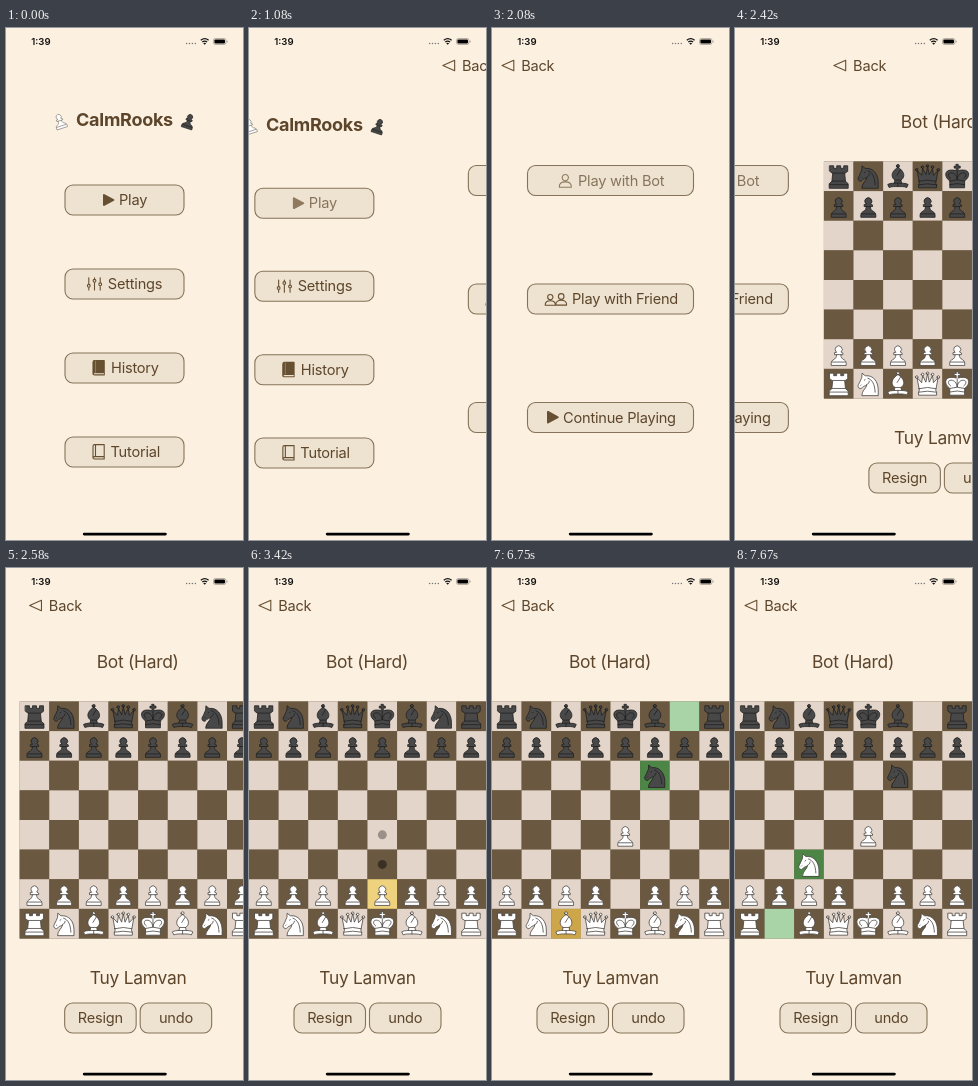
Animation, 237 px wide and 512 px high, one loop 8 s. Source, as an HTML page:

```html
<!DOCTYPE html>
<html lang="en">
<head>
<meta charset="utf-8">
<title>Chess app</title>
<style>
html, body { margin: 0; width: 100%; height: 100%; overflow: hidden; background: #fcf0e0; }
svg { display: block; width: 100vw; height: 100vh; }
text { font-family: Inter, Roboto, sans-serif; font-size: 14.6px; letter-spacing: -.015em; fill: #5c452b; }
.name { font-size: 17.4px; text-anchor: middle; }
.title { font-size: 18px; font-weight: 700; text-anchor: middle; }
.mid { text-anchor: middle; }
.clock { font-size: 9.6px; font-weight: 600; letter-spacing: 0; fill: #111; }
.btn { fill: #eee3d0; stroke: #85745a; stroke-width: 1.1; }
.solid { fill: #674f31; }
.line { fill: none; stroke: #674f31; stroke-width: 1.1; stroke-linejoin: round; stroke-linecap: round; }
</style>
</head>
<body>
<svg id="stage" viewBox="0 0 237 512" preserveAspectRatio="none"></svg>
<script>
const W = 237, LOOP = 8000, TOP = 133.5, CELL = W / 8;
const stage = document.getElementById('stage');

function el(parent, tag, attrs, text) {
  const e = document.createElementNS('http://www.w3.org/2000/svg', tag);
  for (const k in attrs) e.setAttribute(k, attrs[k]);
  if (text) e.textContent = text;
  parent.appendChild(e);
  return e;
}
const group = (parent, attrs) => el(parent, 'g', attrs || {});
const path = (parent, cls, d) => el(parent, 'path', { class: cls, d });
const label = (parent, x, y, text, cls) => el(parent, 'text', { x, y, class: cls || '' }, text);
const ring = (x, y, r) => `M${x - r} ${y}a${r} ${r} 0 1 0 ${2 * r} 0a${r} ${r} 0 1 0 ${-2 * r} 0z`;
const move = (e, x, y) => e.setAttribute('transform', `translate(${x} ${y})`);

// Piece outlines in a 30 x 30 box: body, then inner lines
const SHAPES = {
  p: ['M12.7 13a3.5 3.5 0 1 1 4.6 0l1.9 1v1.6h-2.1c.1 2.7 1 4 3.4 5.2q2 1 2 3.2v2.4h-15v-2.4q0-2.2 2-3.2c2.4-1.2 3.3-2.5 3.4-5.2h-2.1v-1.6z',
    'M8.5 23h13M12.9 15.6h4.2'],
  r: ['M6 4.5h4v2.5h3v-2.5h4v2.5h3v-2.5h4v5.5l-3 2.2 .8 7.8 2.7 2.4v4.6h-19v-4.6l2.7-2.4 .8-7.8-3-2.2z',
    'M9 11.8h12M8.6 19.8h12.8M6 23.4h18'],
  n: ['M8.5 26.6c0-5 4.6-6.6 5-10.6-1.5 1.3-3 1.5-4 2.3-1 .9-1.5 2-2.8 1.6-2-.6-2.5-2.6-1.5-4.2 1.6-2.4 2.2-5 3.3-7l.2-4.2 3.2 2.6c8-.9 13 5.7 13 14.3v5.2z',
    'M14.5 9.5c4.5 1.5 7 6 7.3 14M11 11.5l.8-.5M7.3 16.7l.4-.4M13.5 16c1.6-.9 2.3-2 2.5-3.4'],
  b: [ring(15, 4.6, 1.5) + 'M15 5.8c4 2.8 6.2 5.8 5.8 8.8-.3 2-1.4 3.2-2.8 4.2l.6 3c2.5.2 4.8.3 6.6 1.4l-1.4 3c-2.6-1.2-6.2-.9-8.8-.9s-6.2-.3-8.8.9l-1.4-3c1.8-1.1 4.1-1.2 6.6-1.4l.6-3c-1.4-1-2.5-2.2-2.8-4.2-.4-3 1.8-6 5.8-8.8z',
    'M17.6 8.4l-3.4 5.4M12 18.8h6M11.4 21.8h7.2M15 21.8v3.4'],
  q: ['M6.5 20L4.5 9l4.6 5 1-7 3.2 6.5L15 5l1.7 8.5 3.2-6.5 1 7 4.6-5-2 11c-.6 1-.4 2 .5 3.5v3h-18v-3c.9-1.5 1.1-2.5.5-3.5z' +
    ring(4.2, 8.4, 1.3) + ring(10, 5.8, 1.3) + ring(15, 4.6, 1.3) + ring(20, 5.8, 1.3) + ring(25.8, 8.4, 1.3),
    'M6.5 20q8.5-2.5 17 0M6 23.5q9-2 18 0'],
  k: ['M14 3h2v1.8h2v2h-2v2.6c1.5-.6 3.2-.7 5-.7 6.5 0 7.5 6.5 1.4 11v6.8H7.6v-6.8C1.500 15.200 2.500 8.700 9 8.700c1.800 0 3.500.1 5 .7V6.800h-2v-2h2z',
    'M7.600 19.700q7.400-2.500 14.800 0M7.600 23.300q7.400-2 14.800 0M15 10v8M15 18c-.6-4-3-6.500-6-6.500-3.500 0-3.600 3.500-.6 5.800M15 18c.6-4 3-6.500 6-6.500 3.500 0 3.600 3.500.6 5.800']
};

function piece(parent, kind, black) {
  const g = group(parent, { fill: black ? '#484848' : '#fff', stroke: black ? '#202020' : '#4a4642',
    'stroke-width': .8, 'stroke-linejoin': 'round', 'stroke-linecap': 'round' });
  el(g, 'path', { d: SHAPES[kind][0] });
  el(g, 'path', { d: SHAPES[kind][1], fill: 'none' });
  return g;
}

// Returns the group that holds the button's icon and text
function button(parent, x, y, w, text, textX) {
  el(parent, 'rect', { x, y, width: w, height: 30, rx: 8, class: 'btn' });
  const g = group(parent);
  label(g, textX || x + w / 2, y + 20.2, text, textX ? '' : 'mid');
  return g;
}

function back(parent) {
  path(parent, 'line', 'M10 37.5L21.800 32.300v10.400z');
  label(parent, 29.200, 42.700, 'Back');
}

const person = (x, y, k) => ring(x, y - 3.4 * k, 3.1 * k) +
  `M${x - 6 * k} ${y + 6.2 * k}c${-.3 * k} ${-4 * k} ${2.5 * k} ${-5.3 * k} ${6 * k} ${-5.3 * k}s${6.3 * k} ${1.3 * k} ${6 * k} ${5.3 * k}z`;

// Main menu
const menu = group(stage);
const rows = [];
const row = () => { const g = group(menu); rows.push(g); return g; };

const head = row();
label(head, 118.5, 98.2, 'CalmRooks', 'title');
const pawns = [false, true].map(black => piece(head, 'p', black));
pawns[0].setAttribute('transform', 'translate(54 93.3) rotate(-18) scale(.74) translate(-15 -16.5)');
pawns[0].setAttribute('stroke', '#77726c');
pawns[1].setAttribute('transform', 'translate(182.7 93.3) rotate(18) scale(.74) translate(-15 -16.5)');

const play = button(row(), 59, 157, 119, 'Play', 113);
path(play, 'solid', 'M97 167.2q0-1.6 1.5-.9l9.4 4.9q1.2.8 0 1.6l-9.4 4.9q-1.5.7-1.5-.9z');

const settings = button(row(), 59, 241, 119, 'Settings', 101.8);
path(settings, 'line', [[82.8, 257.8], [88.5, 252.8], [94.2, 256.3]].map(([x, y]) =>
  `M${x} 249.8V${y - 1.4}M${x} ${y + 1.4}V262` + ring(x, y, 1.4)).join(''));

const book = y => `M88.6 ${y}h9.6v12h-9.6q-1.6 0-1.6 1.4v-11.8q0-1.6 1.6-1.6zM87 ${y + 13}q0 1.400 1.600 1.400h9.600v-2.400`;
const spine = y => `M89.500 ${y + .4}v11.200`;
const history = button(row(), 59, 325, 119, 'History', 105);
path(history, 'line', book(332.6)).style.fill = '#674f31';
path(history, 'line', 'M88.500 345.800h9').style.stroke = '#eee3d0';
path(history, 'line', spine(332.6)).style.stroke = '#8d795c';

const tutorial = button(row(), 59, 409, 119, 'Tutorial', 104.5);
path(tutorial, 'line', book(416.6) + spine(416.6));

const drops = [5, 3.2, 2.2, 1.8, 1];

// Mode menu
const modes = group(stage);
back(modes);
const bot = button(modes, 35.5, 137.5, 166, 'Play with Bot', 86);
path(bot, 'line', person(73.3, 153, 1));
const friend = button(modes, 35.5, 256, 166, 'Play with Friend', 80);
path(friend, 'line', person(58.3, 272, .85) + person(69.2, 271.5, .9));
const resume = button(modes, 35.5, 374.5, 166, 'Continue Playing', 71);
path(resume, 'solid', 'M55 384q0-1.6 1.5-.9l9.8 5.3q1.2.8 0 1.6l-9.8 5.3q-1.5.7-1.5-.9z');

// Game screen
const game = group(stage);
back(game);
label(game, 118, 99.8, 'Bot (Hard)', 'name');
label(game, 118.5, 416.3, 'Tuy Lamvan', 'name');
button(game, 45, 435, 71.5, 'Resign');
button(game, 120.5, 435, 71.5, 'undo');

const LIGHT = { base: '#e3d5ca', last: '#a9d4a8', pick: '#efd27d' };
const DARK = { base: '#6b5840', last: '#4d8546', pick: '#cda64a' };
const shade = (c, r) => (c + r) % 2 ? DARK : LIGHT;
const cells = [], men = [];
el(game, 'rect', { x: 0, y: TOP, width: W, height: W, fill: DARK.base });
for (let i = 0; i < 64; i++) {
  cells.push(el(game, 'rect', { x: i % 8 * CELL, y: TOP + (i >> 3) * CELL, width: CELL, height: CELL }));
}
const dotLayer = group(game), manLayer = group(game);
['rnbqkbnr', 'pppppppp', '', '', '', '', 'pppppppp', 'rnbqkbnr'].forEach((line, r) =>
  [...line].forEach((kind, c) => {
    const man = men[r * 8 + c] = piece(manLayer, kind, r < 2);
    placeMan(man, c, r);
  }));
const dots = [0, 1].map(() => el(dotLayer, 'circle', { r: 4.5 }));

function placeMan(man, c, r) {
  move(man, c * CELL - .2, TOP + r * CELL - .2);
}

// Squares are [column, row]
const moves = [
  { at: 3940, from: [4, 6], to: [4, 4] },
  { at: 5190, from: [6, 0], to: [5, 2] },
  { at: 7357, from: [1, 7], to: [2, 5] }
];
for (const m of moves) {
  m.man = men[m.from[1] * 8 + m.from[0]];
  manLayer.appendChild(m.man);
}
const picks = [
  { at: 3410, end: 3990, sq: [4, 6], goals: [[4, 5], [4, 4]] },
  { at: 5910, end: 6740, sq: [3, 6], goals: [[3, 5], [3, 4]] },
  { at: 6740, end: 6990, sq: [2, 7], goals: [] },
  { at: 6990, end: 7410, sq: [1, 7], goals: [[0, 5], [2, 5]] }
];

// Status bar and home indicator
label(stage, 25.2, 17.2, '1:39', 'clock');
for (let i = 0; i < 4; i++) el(stage, 'circle', { cx: 180.6 + i * 2.9, cy: 15.6, r: .75, fill: '#777' });
el(stage, 'path', { d: 'M194.8 12.2q3.9-3.2 7.8 0M196.3 14q2.4-1.9 4.8 0', fill: 'none', stroke: '#111', 'stroke-width': 1.3 });
el(stage, 'path', { d: 'M197.2 15.3q1.5-1.1 3 0l-1.5 1.5z', fill: '#111' });
el(stage, 'rect', { x: 207.5, y: 10.5, width: 12.4, height: 6, rx: 1.8, fill: '#fcf0e0', stroke: '#8b857c', 'stroke-width': .6 });
el(stage, 'rect', { x: 208.4, y: 11.4, width: 10.6, height: 4.2, rx: 1.1, fill: '#000' });
el(stage, 'rect', { x: 220.6, y: 12.6, width: .9, height: 1.9, rx: .4, fill: '#8b857c' });
el(stage, 'rect', { x: 76.8, y: 504.7, width: 84, height: 2.7, rx: 1.35, fill: '#000' });

// Critically damped spring that settles within five refreshes
function slide(t, start) {
  const s = (t - start) * .01472;
  return s <= 0 ? 0 : s > 5.6 ? 1 : 1 - (1 + s) * Math.exp(-s);
}

function ease(s) {
  s = Math.max(0, Math.min(1, s));
  return s < .5 ? 2 * s * s : 1 - 2 * (1 - s) * (1 - s);
}

function draw(ms) {
  // The screen refreshes 12 times a second
  const t = Math.floor((ms + 3.4) * .012) / .012;
  const a = slide(t, 1022.8), b = slide(t, 2272.8);
  move(menu, -W * a, 0);
  move(modes, W * (1 - a - b), 0);
  move(game, W * (1 - b), 0);
  rows.forEach((g, i) => move(g, 0, a > 0 ? drops[i] : 0));
  play.setAttribute('opacity', t > 990 ? .7 : 1);
  bot.setAttribute('opacity', t > 2075 ? .7 : 1);

  const tint = {};
  for (const m of moves) {
    const p = ease((t - m.at) / 300);
    placeMan(m.man, m.from[0] + (m.to[0] - m.from[0]) * p, m.from[1] + (m.to[1] - m.from[1]) * p);
  }
  const last = moves.filter(m => t > m.at + 50).pop();
  if (last) for (const [c, r] of [last.from, last.to]) tint[r * 8 + c] = 'last';
  const pick = picks.find(k => t >= k.at && t < k.end);
  if (pick) tint[pick.sq[1] * 8 + pick.sq[0]] = 'pick';
  cells.forEach((cell, i) => cell.setAttribute('fill', shade(i % 8, i >> 3)[tint[i] || 'base']));
  dots.forEach((dot, i) => {
    const goal = pick && pick.goals[i];
    dot.setAttribute('visibility', goal ? 'visible' : 'hidden');
    if (!goal) return;
    const [c, r] = goal;
    dot.setAttribute('cx', (c + .5) * CELL);
    dot.setAttribute('cy', TOP + (r + .5) * CELL);
    dot.setAttribute('opacity', shade(c, r) === DARK ? .45 : .32);
  });
}

const begin = performance.now();
function tick() {
  draw((performance.now() - begin) % LOOP);
  requestAnimationFrame(tick);
}
draw(0);
requestAnimationFrame(tick);
</script>
</body>
</html>
```
